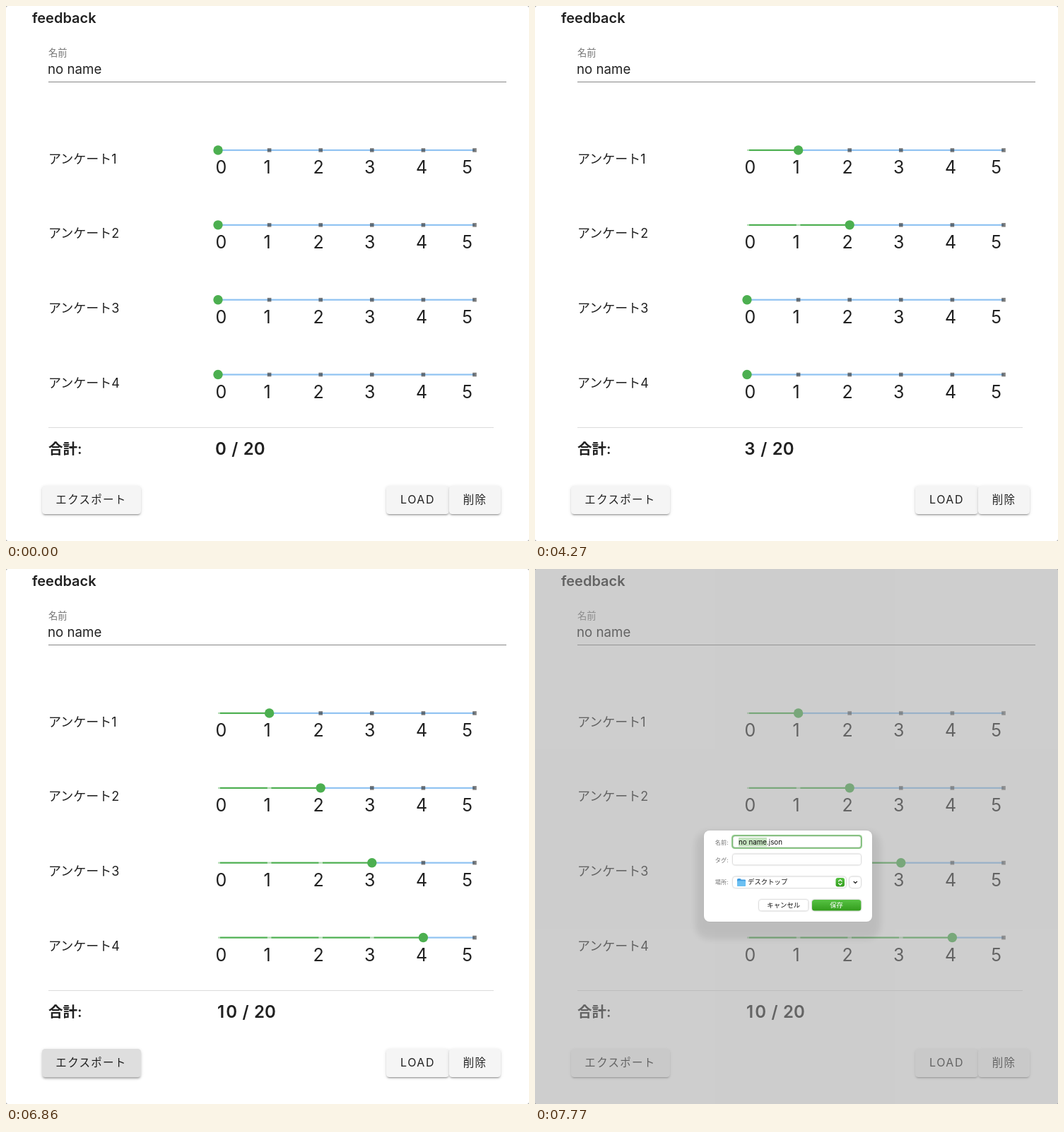
Write an HTML page that moves like this. It is 740 px wide and 757 px high and loops after 8 s.

```html
<!DOCTYPE html>
<html lang="ja">
<head>
<meta charset="utf-8">
<title>feedback</title>
<style>
  html, body { margin: 0; width: 100%; height: 100%; overflow: hidden; background: #999; }
  #stage {
    position: relative; width: 740px; height: 757px; overflow: hidden;
    background: #fff; border-radius: 3px; color: #212121;
    font: 400 18px Inter, "Noto Sans CJK JP", "Noto Sans CJK", sans-serif;
  }
  #stage div, svg { position: absolute; box-sizing: border-box; }
  svg { left: 0; top: 0; overflow: visible; }
  text { fill: #212121; white-space: pre; }
  .bold { font-weight: 600; }
  .mid { text-anchor: middle; }
  .end { text-anchor: end; }

  .btn {
    top: 679px; height: 40px; line-height: 39px; border-radius: 4.5px; overflow: hidden;
    background: #f5f5f5; text-align: center; font-size: 15.5px; letter-spacing: 1.3px;
    box-shadow: 0 3px 1px -2px rgba(0,0,0,.2), 0 2px 2px rgba(0,0,0,.14), 0 1px 5px rgba(0,0,0,.12);
  }
  .btn div { background: #000; opacity: 0; }
  #hover { inset: 0; }
  #ripple { left: -10px; top: -60px; width: 160px; height: 160px; border-radius: 50%; }

  /* The dimming surrounds the dialog but leaves the page below it bright. */
  #dim, #dialog { left: 239px; top: 370px; width: 237.5px; height: 129px; border-radius: 8px; opacity: 0; }
  #dim { box-shadow: 0 0 0 800px #a1a1a1; }
  #dialog {
    background: #fff;
    box-shadow: 0 0 1px rgba(0,0,0,.25), 0 13px 8px 12px rgba(0,0,0,.08);
  }
  #dialog text { font-size: 9.4px; fill: #111; }
  #dialog .tag { font-size: 8.2px; fill: #777; }
  #dialog .save { fill: #999; }
  #dialog.active .save { fill: #fff; }
  .box { fill: #fff; filter: drop-shadow(0 .6px .8px rgba(0,0,0,.38)); }
  .chev { fill: none; stroke: #222; stroke-width: 1.2; stroke-linecap: round; stroke-linejoin: round; }
  .on { display: none; }
  .active .on { display: inline; }
  .active .step { stroke: #fff; }
</style>
</head>
<body>
<div id="stage">
  <svg width="740" height="757" id="page">
    <text class="bold" x="37" y="24" font-size="20">feedback</text>
    <text x="60" y="71" font-size="13.3" style="fill:#757575">名前</text>
    <text x="59" y="96" font-size="18.7">no name</text>
    <path d="M60 107.5H708" stroke="#868686"/>
    <g id="rows"></g>
    <path d="M60 596.5H690" stroke="#dcdcdc"/>
    <text class="bold" x="60" y="634" font-size="20.5">合計:</text>
    <g class="bold" font-size="24">
      <text class="mid" y="635" id="total"></text>
      <text y="635" word-spacing="1.5" id="outOf">/ 20</text>
    </g>
  </svg>

  <div class="btn" id="export" style="left:50.5px;width:140px">エクスポート<div id="hover"></div><div id="ripple"></div></div>
  <div class="btn" style="left:538px;width:89px;font-size:16px;letter-spacing:1.5px">LOAD</div>
  <div class="btn" style="left:627px;width:73px">削除</div>

  <div id="dim"></div>

  <div id="dialog">
    <svg width="237" height="129" viewBox="239 370 237 129">
      <defs>
        <linearGradient id="green" x2="0" y2="1">
          <stop stop-color="#56c243"/><stop offset="1" stop-color="#329c1c"/>
        </linearGradient>
      </defs>
      <text class="tag end" x="273.5" y="389.8">名前:</text>
      <text class="tag end" x="273.5" y="414.6">タグ:</text>
      <text class="tag end" x="273.5" y="446.4">場所:</text>

      <rect class="on" x="278" y="376" width="185" height="20" rx="4.5" fill="#92cf8d"/>
      <rect class="box" x="280.3" y="378.3" width="180.5" height="15.4" rx="3"/>
      <rect class="on" x="288" y="380" width="40" height="12.5" fill="#c5e4c0"/>
      <text x="288" y="390" style="font-size:9.8px">no name.json</text>
      <rect class="box" x="280" y="403.5" width="181" height="15" rx="3"/>

      <rect class="box" x="280" y="435.5" width="160" height="15.5" rx="4"/>
      <path d="M286 439.5q0-1.5 1.5-1.5h3l1.3 1.4h5q1.2 0 1.2 1.2v7q0 1.4-1.4 1.4h-9.2q-1.4 0-1.4-1.4z" fill="#3f9be0"/>
      <rect x="286" y="441.3" width="12" height="7.7" rx="1.3" fill="#6cc0f2"/>
      <text x="301" y="446.4">デスクトップ</text>
      <rect class="on" x="425.5" y="437" width="12.5" height="12.5" rx="3" fill="url(#green)"/>
      <path class="chev step" d="M429.5 441.8l2.3-2.2 2.3 2.2M429.5 444.8l2.3 2.2 2.3-2.2"/>
      <rect class="box" x="445" y="435.5" width="16" height="15.5" rx="4"/>
      <path class="chev" d="M451 442.3l2.3 2.2 2.3-2.2"/>

      <rect class="box" x="317" y="468" width="69.5" height="15.6" rx="3.5"/>
      <text class="mid" x="351.8" y="479.2">キャンセル</text>
      <rect class="box" x="392" y="468" width="69.3" height="15.6" rx="3.5"/>
      <rect class="on" x="392" y="468" width="69.3" height="15.6" rx="3.5" fill="url(#green)"/>
      <text class="mid save" x="426.6" y="479.2">保存</text>
    </svg>
  </div>
</div>

<script>
const LOOP = 8000, TICK = 70;
const X0 = 300, GAP = 72.6, Y0 = 204, PITCH = 105.85, GREEN = '#4caf50';
const HALO = 17.3, HALO_LEAD = 27;
const LABEL_X = [304.3, 369.5, 442, 514.7, 588, 652.6];
const DIGIT_X = 304, DIGIT_STEP = 15.2;

// value, press time, release time
const sliders = [[1, 2380, 2760], [2, 3468, 4020], [3, 4460, 5000], [4, 5530, 5910]]
  .map(([value, press, release]) => ({ value, press, release }));

const $ = id => document.getElementById(id);
const clamp = x => Math.min(1, Math.max(0, x));
const ramp = (t, from, to) => clamp((t - from) / (to - from));

function bezier(x1, y1, x2, y2) {
  const at = (a, b, s) => 3 * a * s * (1 - s) ** 2 + 3 * b * s * s * (1 - s) + s ** 3;
  return x => {
    if (x <= 0 || x >= 1) return clamp(x);
    let lo = 0, hi = 1;
    for (let i = 0; i < 24; i++) {
      const s = (lo + hi) / 2;
      if (at(x1, x2, s) < x) lo = s; else hi = s;
    }
    return at(y1, y2, lo);
  };
}
const slide = bezier(.25, .8, .5, 1);
const swell = bezier(.25, .8, .25, 1);

function add(parent, tag, attrs, text) {
  const el = document.createElementNS('http://www.w3.org/2000/svg', tag);
  for (const k in attrs) el.setAttribute(k, attrs[k]);
  if (text !== undefined) el.textContent = text;
  return parent.appendChild(el);
}

sliders.forEach((s, row) => {
  const g = add($('rows'), 'g', { transform: `translate(0 ${Y0 + row * PITCH})` });
  add(g, 'text', { x: 60, y: 18.5, 'font-size': 18 }, 'アンケート' + (row + 1));
  s.rest = add(g, 'rect', { y: -1.1, height: 2.2, fill: '#90c3f2' });
  s.fill = add(g, 'rect', { x: X0, y: -1.1, height: 2.2, fill: GREEN });
  s.ticks = LABEL_X.map((x, i) => {
    add(g, 'text', { x, y: 33, 'font-size': 25, class: 'mid' }, i);
    return add(g, 'rect', { x: X0 + i * GAP - 2.8, y: -2.8, width: 5.6, height: 5.6, opacity: .58 });
  });
  s.halo = add(g, 'circle', { cy: 0, fill: GREEN, opacity: .3 });
  s.thumb = add(g, 'circle', { cy: 0, r: 6.7, fill: GREEN });
});

function drawSlider(s, t) {
  const p = slide((t - s.press) / 300);
  const x = X0 + GAP * s.value * p;
  s.fill.setAttribute('width', x - X0);
  s.rest.setAttribute('x', x);
  s.rest.setAttribute('width', X0 + GAP * 5 - x);
  s.thumb.setAttribute('cx', x);
  s.halo.setAttribute('cx', x);
  const size = swell((t - s.press + HALO_LEAD) / 300) - swell((t - s.release) / 300);
  s.halo.setAttribute('r', HALO * (.1 + .9 * size));
  s.ticks.forEach((tick, i) => {
    const k = i < s.value ? p : 0, c = 33 + 222 * k;
    tick.setAttribute('fill', `rgb(${c},${c},${c})`);
  });
}

// Each digit is centred in a cell of equal width.
function drawTotal(t) {
  const sum = sliders.reduce((n, s) => n + (t >= s.press ? s.value : 0), 0);
  const digits = [...String(sum)];
  $('total').textContent = sum;
  $('total').setAttribute('x', digits.map((_, i) => DIGIT_X + DIGIT_STEP * i).join(' '));
  $('outOf').setAttribute('x', DIGIT_X + DIGIT_STEP * digits.length);
}

function drawExport(t) {
  $('hover').style.opacity = .08 * (ramp(t, 6440, 6650) - ramp(t, 7520, 7700));
  const r = ramp(t, 6580, 6930);
  $('ripple').style.opacity = r > 0 ? .1 * (1 - r) : 0;
  $('ripple').style.transform = `scale(${.2 + .8 * swell(r)})`;
  const lift = ramp(t, 6510, 6650) - ramp(t, 6720, 6930);
  $('export').style.boxShadow =
    `0 ${3 + lift}px ${1 + 3 * lift}px -2px rgba(0,0,0,.2), ` +
    `0 ${2 + 2 * lift}px ${2 + 3 * lift}px rgba(0,0,0,.14), ` +
    `0 1px ${5 + 2 * lift}px rgba(0,0,0,.12)`;
}

function drawDialog(t) {
  const p = ramp(t, 7420, 7770), left = (1 - p) ** 2;
  $('dim').style.opacity = .52 * p;
  $('dialog').style.opacity = p > 0 ? 1 - .84 * left : 0;
  $('dim').style.transform = $('dialog').style.transform = `translateY(${-34 * left}px)`;
  $('dialog').classList.toggle('active', t >= 7630);
}

function draw(t) {
  sliders.forEach(s => drawSlider(s, t));
  drawTotal(t);
  drawExport(t);
  drawDialog(t);
}

// The screen refreshes in fixed ticks.
function frame() {
  draw(Math.floor(performance.now() % LOOP / TICK) * TICK);
  requestAnimationFrame(frame);
}
frame();
</script>
</body>
</html>
```
